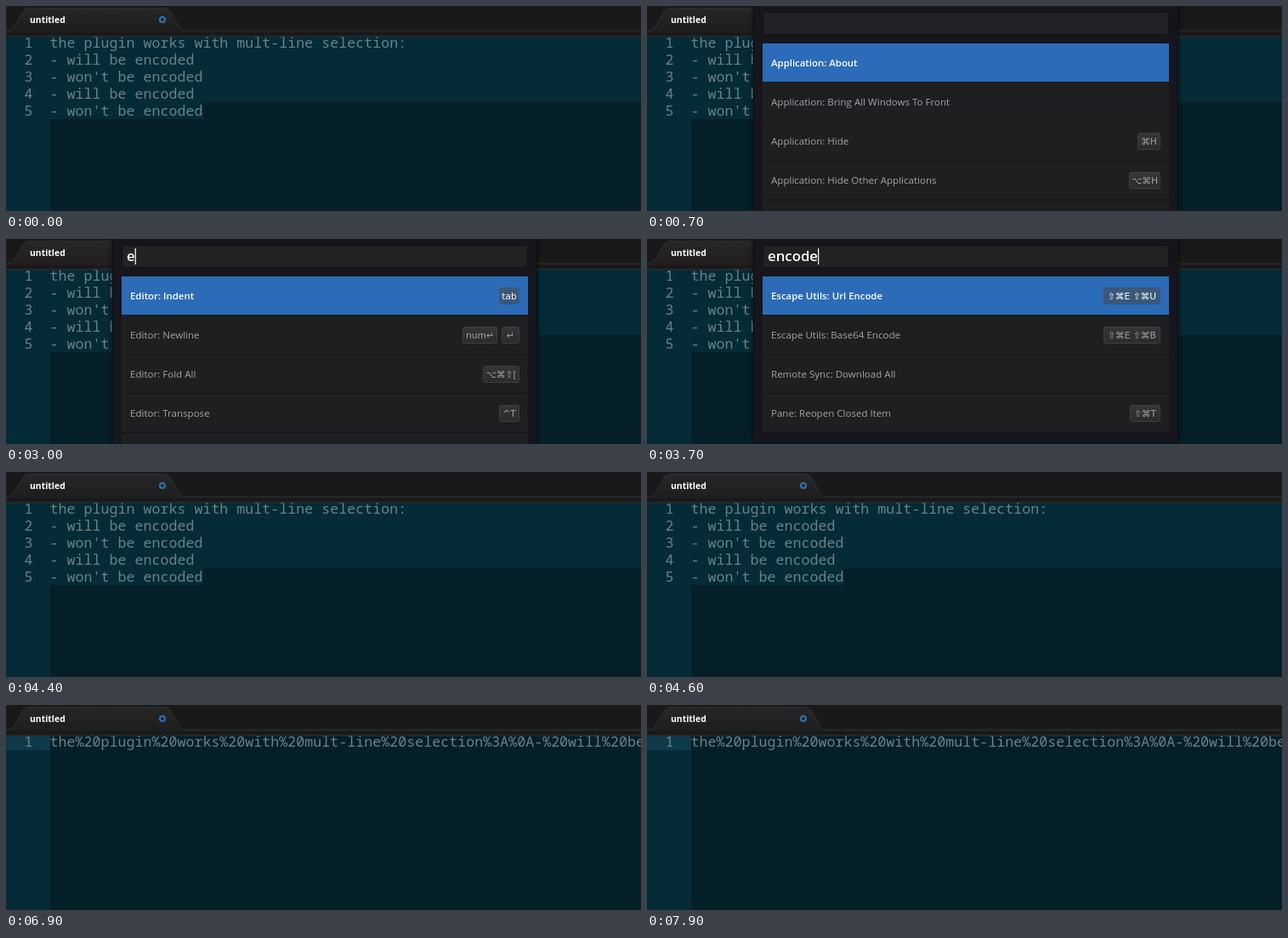
Write an HTML page that moves like this. It is 747 px wide and 241 px high and loops after 8000 ms.

```html
<!DOCTYPE html>
<html lang="en">
<head>
<meta charset="utf-8">
<title>Editor: url encode</title>
<style>
  html, body { margin: 0; width: 100%; height: 100%; overflow: hidden; background: #051f28; }
  svg { display: block; width: 747px; height: 241px; }
  text { white-space: pre; }
  .code { font: 500 16.667px "Noto Sans Mono", "DejaVu Sans Mono", monospace; fill: #6a8288; }
  .ui { font: 500 11.55px "Open Sans", "Noto Sans", sans-serif; fill: #a0a4a6; }
  .ui.on { font-size: 11.4px; font-weight: 600; fill: #fff; }
  .key { font: 10.7px "DejaVu Sans", sans-serif; fill: #a0a4a6; text-anchor: middle; }
  .key.on { fill: #fff; }
  .tab { font: 700 10.4px "Open Sans", "Noto Sans", sans-serif; fill: #fff; }
  .query { font: 600 16.8px "Open Sans", "Noto Sans", sans-serif; fill: #fff; }
</style>
</head>
<body>
<svg id="stage" viewBox="0 0 747 241">
  <defs>
    <linearGradient id="tabFill" x2="0" y2="1">
      <stop stop-color="#272727"/><stop offset="1" stop-color="#1c1c1c"/>
    </linearGradient>
    <linearGradient id="keyFill" x2="0" y2="1">
      <stop stop-color="#343638"/><stop offset="1" stop-color="#292b2d"/>
    </linearGradient>
    <filter id="shadow" x="-10%" y="-10%" width="120%" height="120%">
      <feDropShadow dx="0" dy="0" stdDeviation="3" flood-color="#000" flood-opacity=".6"/>
    </filter>
  </defs>

  <rect width="747" height="241" fill="#051f28"/>
  <rect y="33" width="52" height="208" fill="#042b36"/>
  <g id="plain"></g>
  <g id="encoded"></g>

  <rect width="747" height="33" fill="#191919"/>
  <path d="M-2 29H3Q7 29 9 25.5L20.5 6Q22.5 2.5 27 2.5H187Q191 2.5 193 6L204 25.5Q206 29 210 29H749V36H-2Z" fill="url(#tabFill)" stroke="#303030"/>
  <rect y="32" width="747" height="1" fill="#101314"/>
  <text class="tab" x="28" y="20">untitled</text>
  <circle cx="184" cy="16" r="3" fill="none" stroke="#2b74b8" stroke-width="2"/>

  <rect id="caret" x="52" y="33" width="1.2" height="20" fill="#fff"/>

  <g id="palette">
    <rect id="panel" x="125.5" y="-10" width="499" fill="#18191a" stroke="#101112" filter="url(#shadow)"/>
    <rect x="136.5" y="7.5" width="477" height="26" rx="2" fill="#202224" stroke="#101112"/>
    <text id="query" class="query" x="142" y="26"></text>
    <rect id="queryCaret" y="11" width="1.2" height="19" fill="#fff"/>
    <g id="lists"></g>
  </g>
</svg>

<script>
const LOOP = 8000, BLINK = 400;
const OPEN = 300, CLOSE = 4100, ENCODE = 5000, DESELECT = 5500;
const FILTERED = 3200, SHORT_LIST = 3700;

const strokes = [[2900, 'e'], [3100, 'en'], [3200, 'enc'], [3300, 'enco'], [3450, 'encod'], [3600, 'encode']];

const lines = [
  'the plugin works with mult-line selection:',
  '- will be encoded', "- won't be encoded",
  '- will be encoded', "- won't be encoded"
];

// Each item: label, then its shortcuts as [left, right, text].
const menus = [
  [
    ['Application: About'],
    ['Application: Bring All Windows To Front'],
    ['Application: Hide', [577, 604, '⌘H']],
    ['Application: Hide Other Applications', [567, 604, '⌥⌘H']]
  ],
  [
    ['Editor: Indent', [580, 604, 'tab']],
    ['Editor: Newline', [537, 578, 'num↵'], [583, 604, '↵']],
    ['Editor: Fold All', [561, 604, '⌥⌘⇧[']],
    ['Editor: Transpose', [580, 604, '^T']]
  ],
  [
    ['Escape Utils: Url Encode', [537, 604, '⇧⌘E ⇧⌘U']],
    ['Escape Utils: Base64 Encode', [537, 604, '⇧⌘E ⇧⌘B']],
    ['Remote Sync: Download All'],
    ['Pane: Reopen Closed Item', [568, 604, '⇧⌘T']]
  ]
];

const $ = id => document.getElementById(id);

function add(parent, tag, attrs, text = '') {
  const el = document.createElementNS('http://www.w3.org/2000/svg', tag);
  for (const name in attrs) el.setAttribute(name, attrs[name]);
  el.textContent = text;
  return parent.appendChild(el);
}

const rect = (parent, x, y, width, height, fill, more) =>
  add(parent, 'rect', { x, y, width, height, fill, ...more });

const show = (el, visible) => el.setAttribute('visibility', visible ? 'inherit' : 'hidden');

function codeLine(parent, row, text) {
  const y = 49 + row * 20;
  add(parent, 'text', { class: 'code', x: 21.5, y }, row + 1);
  add(parent, 'text', { class: 'code', x: 51.5, y }, text);
}

function buildMenu(items) {
  const list = add($('lists'), 'g', {});
  items.forEach(([label, ...keys], i) => {
    const y = 44 + i * 46, on = i === 0 ? ' on' : '';
    rect(list, 136, y, 478, 45, on ? '#2b6bb8' : '#1e1f20');
    rect(list, 136, y + 45, 478, 1, '#161718');
    add(list, 'text', { class: 'ui' + on, x: 146, y: y + 27 }, label);
    for (const [left, right, text] of keys) {
      rect(list, left + .5, y + 13.5, right - left - 1, 19, on ? '#3a5878' : 'url(#keyFill)',
        { rx: 2, stroke: on ? '#3a587a' : '#3d3f41' });
      add(list, 'text', { class: 'key' + on, x: (left + right) / 2, y: y + 27 }, text);
    }
  });
  return list;
}

rect($('plain'), 52, 33, 695, 80, '#042b36');
rect($('plain'), 52, 113, 180, 20, '#042b36');
lines.forEach((text, row) => codeLine($('plain'), row, text));

const selection = rect($('encoded'), 52, 33, 695, 20, '#042b36');
const gutterMark = rect($('encoded'), 0, 33, 52, 20, '#0c3a4b');
codeLine($('encoded'), 0, encodeURIComponent(lines.join('\n')));

const lists = menus.map(buildMenu);
const fifthRow = rect($('lists'), 136, 229, 478, 12, '#1e1f20');

const blinkOn = (t, since) => Math.floor((t - since) / BLINK) % 2 === 0;

function render(t) {
  const done = t >= ENCODE, deselected = t >= DESELECT;
  show($('plain'), !done);
  show($('encoded'), done);
  show(selection, done && !deselected);
  show(gutterMark, deselected);
  // A keystroke holds the caret on briefly before it blinks.
  show($('caret'), deselected && blinkOn(Math.max(t, DESELECT + 100), DESELECT + 100));

  const open = t >= OPEN && t < CLOSE;
  show($('palette'), open);
  if (!open) return;

  const [typedAt, query] = strokes.filter(([at]) => t >= at).pop() || [0, ''];
  const current = !query ? 0 : t < FILTERED ? 1 : 2;
  lists.forEach((list, i) => show(list, i === current));
  show(fifthRow, t < SHORT_LIST);
  $('panel').setAttribute('height', t < SHORT_LIST ? 270 : 248.5);
  $('query').textContent = query;
  $('queryCaret').setAttribute('x', 142 + $('query').getComputedTextLength());
  show($('queryCaret'), query ? t - typedAt < 500 : blinkOn(t, OPEN));
}

function tick() {
  render(performance.now() % LOOP);
  requestAnimationFrame(tick);
}
tick();
</script>
</body>
</html>
```
